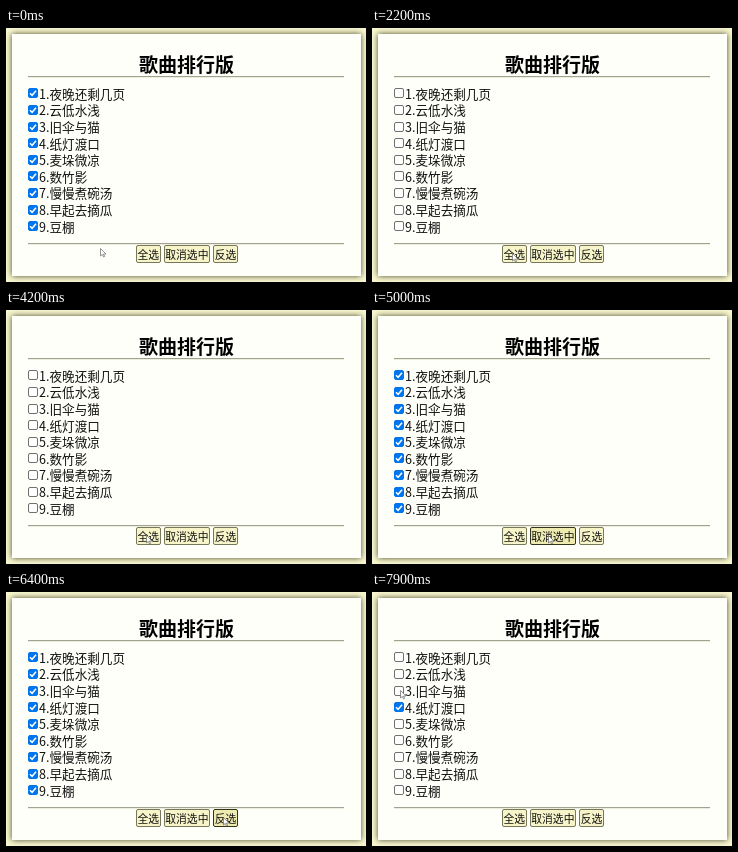
Animation of 360x254 px, one loop 8000 ms. Source, as an HTML page:

```html
<!DOCTYPE html>
<html lang="zh-CN">
<head>
<meta charset="utf-8">
<title>歌曲排行版</title>
<style>
  html, body { margin: 0; width: 100%; height: 100%; overflow: hidden; background: #f8f7cf; }
  #stage { position: relative; width: 360px; height: 254px; overflow: hidden; color: #111;
    font-family: "Noto Sans CJK SC", "Noto Sans CJK", sans-serif; }
  #stage > * { position: absolute; box-sizing: border-box; white-space: nowrap; }
  .card { left: 6px; top: 6px; width: 349px; height: 242px; background: #fffffa;
    box-shadow: 0 0 6px #44442c; }
  h1 { left: 0; top: 24px; width: 361px; margin: 0; font-size: 19px; line-height: 24px;
    text-align: center; color: #000; }
  .rule { left: 22px; width: 316px; height: 2px; border-top: 1px solid #a2a294;
    border-bottom: 1px solid #ededdc; }
  .song { left: 33px; font-size: 12.6px; line-height: 16px; }
  .box { left: 22px; width: 10px; height: 10px; border: 1px solid #707070; border-radius: 2px;
    background: #fff; }
  .box.on { border-color: #0075ee; background: #0075ee; }
  .box svg { display: none; position: absolute; left: -1px; top: -1px; }
  .box.on svg { display: block; }
  #bar { left: 130px; top: 217px; display: flex; gap: 3.2px; }
  .btn { padding: 0 .5px; border: 1px solid #77775a; border-radius: 2px; background: #f6f4c8;
    font-size: 10.8px; line-height: 16px; }
  .btn.hot { border-color: #33331c; background: #eeebb0; }
  #cursor { left: 0; top: 0; }
</style>
</head>
<body>
<div id="stage">
  <div class="card"></div>
  <h1>歌曲排行版</h1>
  <div class="rule" style="top:48px"></div>
  <div class="rule" style="top:215px"></div>
  <div id="bar">
    <div class="btn" id="all">全选</div>
    <div class="btn" id="none">取消选中</div>
    <div class="btn" id="invert">反选</div>
  </div>
</div>
<script>
const LOOP = 8000, STEP = 100;
const HOVER = 400, TRAVEL = 400;   // rest before a click, longest move
const ROW = 16.6;
const stage = document.getElementById('stage');
const bar = document.getElementById('bar');
const btns = [...bar.children];
const songs = ['夜晚还剩几页', '云低水浅', '旧伞与猫', '纸灯渡口', '麦垛微凉',
  '数竹影', '慢慢煮碗汤', '早起去摘瓜', '豆棚'];

// What is clicked (button id or row index) and when
const clicks = [
  ['none', 1300], ['all', 2600], ['none', 3700], ['all', 4600], ['none', 5300],
  ['invert', 6000], ['invert', 6500], ['invert', 6800], ['invert', 7000],
  [3, 7700], [2, 8300]
];
const actions = { all: () => true, none: () => false, invert: on => !on };

function add(cls, top, html) {
  const el = document.createElement('div');
  el.className = cls;
  el.style.top = `${top}px`;
  el.innerHTML = html;
  return stage.appendChild(el);
}

const tick = '<svg width="10" height="10"><path d="M2 5.2 4.1 7.3 8 2.8" ' +
  'fill="none" stroke="#fff" stroke-width="1.5"/></svg>';
const boxes = songs.map((name, i) => {
  const y = 60.4 + i * ROW;
  add('song', y - 2.6, `${i + 1}.${name}`);
  return add('box', Math.round(y), tick);
});
const cursor = add('', 0, '<svg width="7" height="10" style="display:block">' +
  '<path d="M.5.5V8L2.3 6.4 3.5 9 4.6 8.5 3.5 6H6Z" fill="#fff" ' +
  'stroke="#666" stroke-width=".7"/></svg>');
cursor.id = 'cursor';

function spot(target) {
  if (typeof target === 'number') return [28, 65 + target * ROW];
  const el = document.getElementById(target);
  return [bar.offsetLeft + el.offsetLeft + el.offsetWidth * 0.4, 225];
}

function checkedAt(t) {
  let state = songs.map(() => true);
  for (const [target, at] of clicks) {
    if (at > t) break;
    const act = actions[target];
    state = state.map((on, i) => act ? act(on) : on !== (i === target));
  }
  return state;
}

function cursorAt(t) {
  let pos = [94, 220], last = 0;
  for (const [target, at] of clicks) {
    const end = Math.max(last, at - HOVER);
    const begin = Math.max(last, end - TRAVEL);
    if (t < begin) break;
    const u = end > begin ? Math.min(1, (t - begin) / (end - begin)) : 1;
    const k = u * u * (3 - 2 * u);
    const to = spot(target);
    pos = pos.map((p, i) => p + (to[i] - p) * k);
    if (t < at) break;
    last = at;
  }
  return pos;
}

function draw(t) {
  const state = checkedAt(t);
  boxes.forEach((el, i) => el.classList.toggle('on', state[i]));
  btns.forEach(el => el.classList.toggle('hot',
    clicks.some(([id, at]) => id === el.id && Math.abs(t - at) < HOVER)));
  const [x, y] = cursorAt(t).map(Math.round);
  cursor.style.transform = `translate(${x}px, ${y}px)`;
}

const start = performance.now();
function frame(now) {
  const t = Math.max(0, now - start) % LOOP;
  draw(Math.floor(t / STEP) * STEP);
  requestAnimationFrame(frame);
}
draw(0);
requestAnimationFrame(frame);
</script>
</body>
</html>
```
